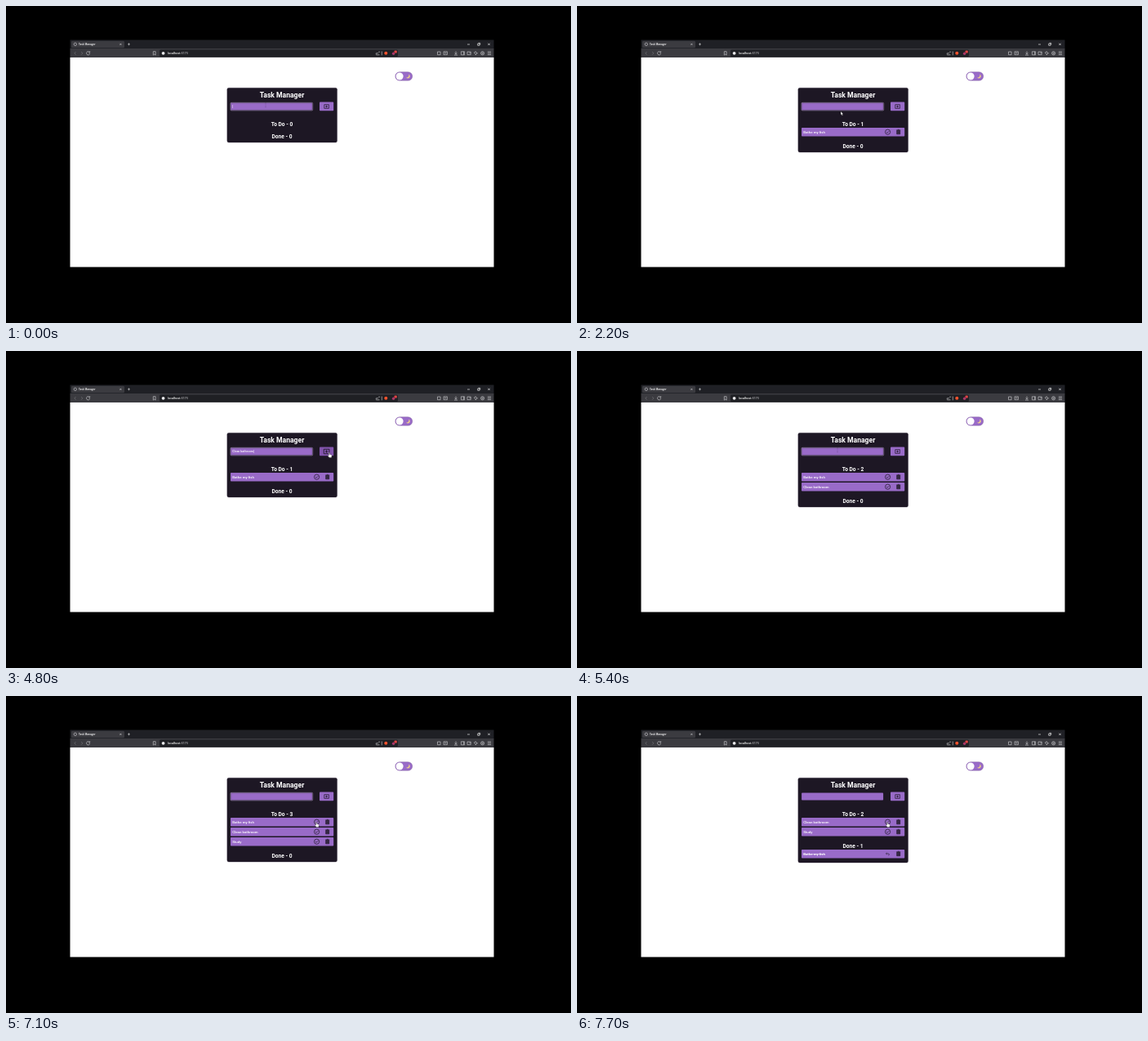
An HTML page that plays this animation: 692 by 388 pixels, repeating every 8 s.

```html
<!DOCTYPE html>
<html lang="en">
<head>
<meta charset="utf-8">
<title>Task Manager</title>
<style>
  html, body { margin: 0; width: 100%; height: 100%; overflow: hidden; background: #000; }
  svg { display: block; width: 692px; height: 388px; }
  text { fill: #fff; font-family: Roboto, sans-serif; font-weight: 500; white-space: pre; }
  .ui { font-family: "Open Sans", sans-serif; font-weight: 600; }
  .head { font-weight: 700; text-anchor: middle; }
  .line { fill: none; stroke: #c9c9cd; stroke-width: .65; }
  .ink { fill: none; stroke: #1d1724; stroke-width: .7; }
</style>
</head>
<body>
<svg viewBox="0 0 692 388">
  <rect width="692" height="388"/>
  <rect x="78.5" y="63" width="519" height="256.5" fill="#fff"/>
  <rect x="78.5" y="41.5" width="519" height="11" fill="#1f2025"/>
  <rect x="78.5" y="52" width="519" height="11" fill="#3b3b40"/>
  <rect x="80" y="42.7" width="65" height="8.6" rx="1.5" fill="#3b3b40"/>
  <rect x="188" y="53.4" width="292" height="8.6" rx="1.5" fill="#1f2024"/>
  <text class="ui" x="89" y="48" font-size="3.1">Task Manager</text>
  <text class="ui" x="198" y="59.1" font-size="3.6">localhost<tspan fill="#b5b5b9">:5173</tspan></text>
  <g class="line">
    <circle cx="84.8" cy="46.8" r="1.7"/>
    <path d="M139.4 45.8l2 2m0-2l-2 2M149 46.8h3m-1.5-1.5v3"/>
    <path d="M565 47h3M577.7 46h2.3v2.3h-2.3zM578.5 45.3h2.2v2.2M590.3 45.6l2.4 2.4m0-2.4l-2.4 2.4" stroke="#eee"/>
    <path d="M85.5 56l-1.6 1.8 1.6 1.8M92.2 56l1.6 1.8-1.6 1.8" stroke="#77777c"/>
    <path d="M102.3 56.5a2.1 2.1 0 1 0 .4 1.6M102.7 55.3v1.6h-1.6"/>
    <path d="M180.3 55.7h2.8v4.4l-1.4-1.1-1.4 1.1z"/>
    <path d="M453.3 59.4v-1.6h2.8m-2.8 2h4.2m-1.3-3.6h2M460.3 55.5v4.8"/>
    <path d="M528.5 56h3.6v3.7h-3.6zM536 55.8h4.4v3.8H536zM537 57.5h2.4"/>
    <path d="M551 55.5v3.3m-1.4-1.3l1.4 1.4 1.4-1.4M549 60h4M557.4 55.8h4.2v4h-4.2zM560.4 55.8v4"/>
    <path d="M565 56h4.2v3.6H565zM567.4 57.3h1.8M573.3 57l2-1.3.7 1.4 1.4.7-1.4.7-.7 1.4-.7-1.4z"/>
    <circle cx="583.6" cy="57.8" r="2.1"/><circle cx="583.6" cy="57.8" r=".8"/>
    <path d="M589.8 56h4.3m-4.3 1.8h4.3m-4.3 1.8h4.3"/>
  </g>
  <circle cx="192.6" cy="57.8" r="1.9" fill="#e8e8ea"/>
  <circle cx="465.3" cy="57.8" r="2" fill="#f5522d"/>
  <circle cx="474.6" cy="58.2" r="1.7" fill="#a8386c"/>
  <rect x="475.6" y="54.6" width="3.2" height="3" rx=".7" fill="#e04444"/>
  <rect x="476.8" y="80.8" width="20.9" height="10.4" rx="5.2" fill="#996bc8" stroke="#70498f" stroke-width=".4"/>
  <circle cx="482.1" cy="86" r="4.5" fill="#fff"/>
  <path d="M493.3 83.6a2.6 2.6 0 1 1-3.2 3.9a2.9 2.9 0 0 0 3.2-3.9z" fill="#f0d08a"/>
  <g id="app"></g>
</svg>
<script>
const LOOP = 8000, KEY = 75, BLINK = 200, ROW = 12, PURPLE = '#996bc8';
const BLUR = 4900, REFOCUS = 5200, CHECK = 7300;
const app = document.getElementById('app');

// Words come in bursts of [start, letters], one letter every KEY ms
const tasks = [
  { bursts: [[600, 'Bathe'], [1300, ' my fish']], sent: 1900, done: CHECK },
  { bursts: [[2600, 'Cle'], [3000, 'an bat'], [3550, 'hroom']], sent: BLUR },
  { bursts: [[5800, 'Study']], sent: 6500 }
];
for (const k of tasks) k.name = k.bursts.map(b => b[1]).join('');

// Each move: start, end, x, y
const moves = [
  [100, 200, 323, 129],
  [4400, 4750, 395.3, 124],
  [BLUR, 5300, 319, 121],
  [6800, 7080, 379.5, 154]
];

function mouseAt(t) {
  let x = 318, y = 121;
  for (const [from, to, tx, ty] of moves) {
    const p = Math.min(1, Math.max(0, (t - from) / (to - from)));
    const e = p * p * (3 - 2 * p);
    x += (tx - x) * e;
    y += (ty - y) * e;
  }
  return [x, y];
}

// Text in the field and the time of the last event that restarts the caret
function field(t) {
  let typed = '', since = t >= REFOCUS ? REFOCUS : 0;
  for (const k of tasks) {
    if (t >= k.sent) since = Math.max(since, k.sent);
    else for (const [from, s] of k.bursts) {
      if (t < from) break;
      const n = Math.min(s.length, 1 + Math.floor((t - from) / KEY));
      typed += s.slice(0, n);
      since = from + (n - 1) * KEY;
    }
  }
  return [typed, since];
}

const rect = (x, y, w, h, r, fill, more = '') =>
  `<rect x="${x}" y="${y}" width="${w}" height="${h}" rx="${r}" fill="${fill}" ${more}/>`;
const text = (x, y, size, s, more = '') =>
  `<text x="${x}" y="${y}" font-size="${size}" ${more}>${s}</text>`;
const head = (y, size, s) => text(338, y, size, s, 'class="head"');
const icon = (x, y, d, size = 1, fill = 'none') =>
  `<path class="ink" transform="translate(${x} ${y}) scale(${size})" d="${d}" style="fill:${fill}"/>`;

function row(task, y, done) {
  const mid = y + 5.2;
  const mark = done
    ? icon(380.5, mid, 'M-1-1.4l-1.4 1.2 1.4 1.2M-2.2-.2h3.2a1.2 1.2 0 0 1 0 2.4', .85)
    : icon(380.6, mid, 'M-3.1 0a3.1 3.1 0 1 0 6.2 0a3.1 3.1 0 1 0-6.2 0M-1.4 0l1 1.1 2-2.1');
  return rect(275, y, 126.2, 10.6, .8, PURPLE) +
    text(277.2, y + 6.7, 4.4, task.name, done ? 'text-decoration="line-through"' : '') + mark +
    icon(393.7, mid, 'M-2.6-2.2h5.2M-1-2.9h2M-2-1.6h4v4.2h-4zM-.7-.6v2.2M.7-.6v2.2', 1, '#1d1724aa');
}

function pointer(x, y, overInput, overLink) {
  const at = `transform="translate(${x} ${y})" stroke-linejoin="round"`;
  if (overInput)
    return `<path ${at} d="M-.8-2.8h1.6M0-2.8v5.6M-.8 2.8h1.6" fill="none" stroke="#1d1724" stroke-width=".4" opacity=".3"/>`;
  const d = overLink
    ? 'M0 .5q.6-.8 1.1 0v2l2.1.5q.7.2.6 1l-.5 2.4h-2.7l-1.8-2.2q.1-.8 1.2-.2z'
    : 'M0 0v4.4l1-.9.8 1.7.8-.4-.8-1.6h1.4z';
  return `<path ${at} d="${d}" fill="#fff" stroke="#111" stroke-width=".3"/>`;
}

// Measures the typed text so the caret sits after it
const pen = document.createElement('canvas').getContext('2d');
pen.font = '500 100px Roboto, sans-serif';

function draw(t) {
  const todo = tasks.filter(k => t >= k.sent + 100 && !(t >= k.done));
  const done = tasks.filter(k => t >= k.done);
  const [typed, since] = field(t);
  const focus = t < BLUR || (t >= REFOCUS && t < CHECK);
  const caret = focus && Math.floor((t - since) / BLINK) % 2 === 0;
  const [mx, my] = mouseAt(t);
  const over = (x, y, w, h) => mx > x && mx < x + w && my > y && my < y + h;
  const hover = over(384, 117.6, 17.2, 10.7);
  const onCheck = over(377, 149, 7, ROW * todo.length);
  const shift = ROW * todo.length;

  let s = rect(270.8, 100.2, 134.8, 66.9 + shift + (ROW + 1) * done.length, 2, '#1d1724', 'stroke="#3d3348" stroke-width=".3"');
  s += head(112, 8.6, 'Task Manager');
  s += rect(275.1, 118.6, 100, 9, .8, PURPLE);
  if (focus) {
    s += rect(275, 118.3, 100.7, 9.6, 1, 'none', 'stroke="#b8a6c8" stroke-width=".5"');
    s += rect(275.6, 118.9, 99.5, 8.4, .7, 'none', 'stroke="#4f3a66" stroke-width=".35"');
  }
  s += text(277.2, 124.3, 3.6, typed);
  if (caret) s += rect(277.4 + pen.measureText(typed).width * .036, 121, .4, 4, 0, '#fff');
  s += rect(384, 117.6, 17.2, 10.7, .8, hover ? '#8355ae' : PURPLE);
  s += icon(392.6, 123, 'M-2.8-2.3h5.6v4.6h-5.6zM-1.4 0h2.8M0-1.4v2.8', hover ? 1.2 : 1);
  s += head(146.6, 6.6, `To Do - ${todo.length}`);
  todo.forEach((k, i) => s += row(k, 149 + ROW * i, false));
  s += head(161.8 + shift, 6.6, `Done - ${done.length}`);
  done.forEach((k, i) => s += row(k, 163.9 + shift + ROW * i, true));
  s += pointer(mx, my, over(275, 118.4, 100.7, 9.4), hover || onCheck);
  app.innerHTML = s;
}

const start = performance.now();
(function frame() {
  draw((performance.now() - start) % LOOP);
  requestAnimationFrame(frame);
})();
</script>
</body>
</html>
```
